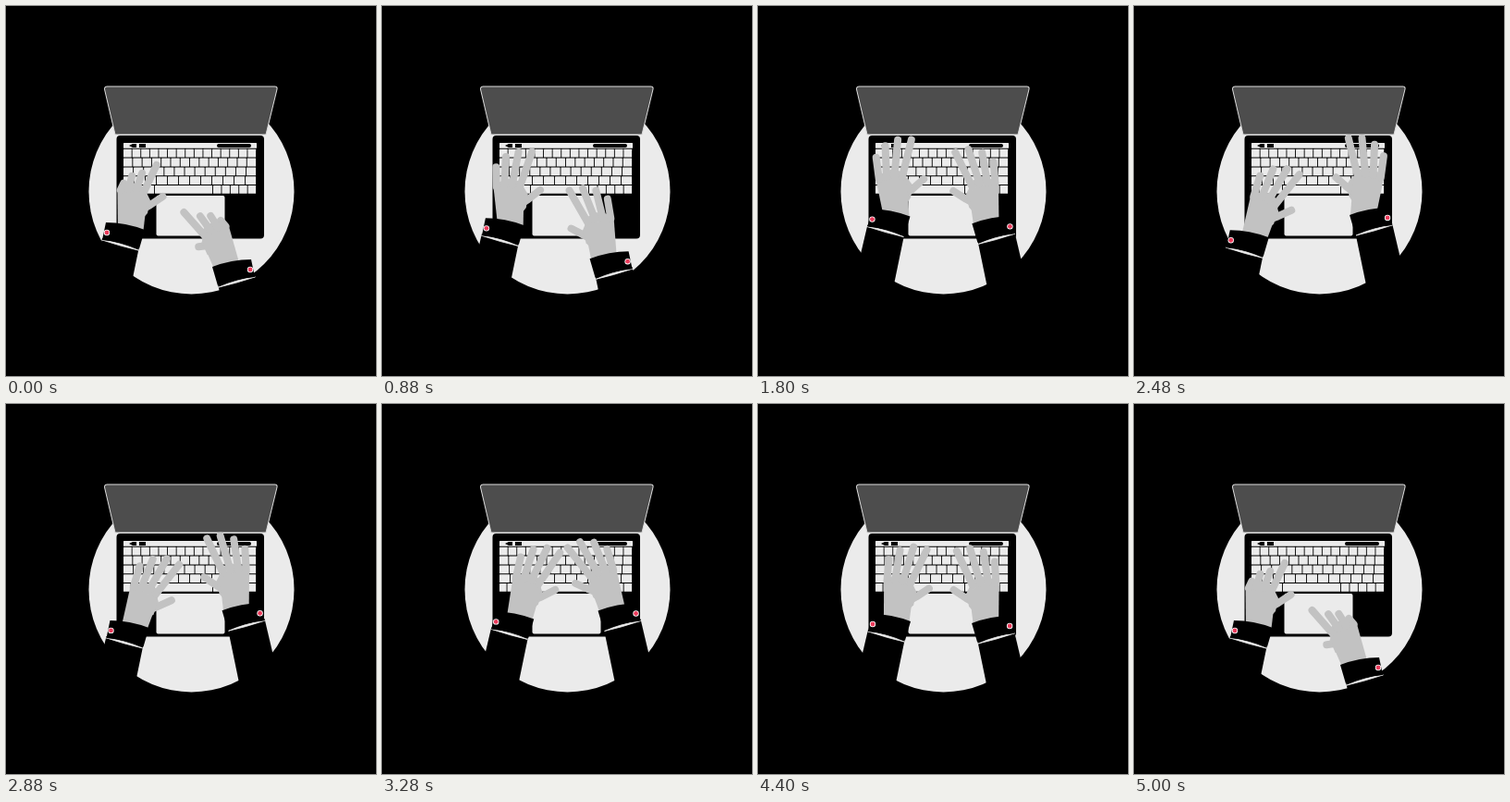
An HTML page with a canvas for the animation above (5.04 s loop, 400 by 400 pixels).

```html
<!DOCTYPE html>
<html lang="en">
<head>
<meta charset="utf-8">
<title>Typing hands</title>
<style>
  html, body { margin: 0; width: 100%; height: 100%; overflow: hidden; background: #000; }
  canvas { display: block; width: 400px; height: 400px; }
</style>
</head>
<body>
<canvas id="stage" width="400" height="400"></canvas>
<script>
const ctx = document.getElementById('stage').getContext('2d');
const LOOP = 5040;
const LIGHT = '#ebebeb', SKIN = '#c2c2c2', LID = '#4d4d4d', PINK = '#ec3b5b';
const TAU = Math.PI * 2;

const rad = degrees => degrees * Math.PI / 180;
const mix = (a, b, u) => a + (b - a) * u;
const polar = (degrees, r) => [Math.sin(rad(degrees)) * r, -Math.cos(rad(degrees)) * r];

function ease(from, to, time) {
  const u = Math.min(1, Math.max(0, (time - from) / (to - from)));
  return u * u * (3 - 2 * u);
}

// Both hands rest, travel to the keyboard, type, and return.
function posesAt(time) {
  const back = ease(4450, 4840, time);
  const typing = ease(680, 1280, time) - back;
  const curl = 1 - ease(500, 1000, time) + back;
  const wiggle = 1.5 * (1 - Math.cos(TAU * time / 560));

  const arc = Math.sin(Math.PI * (time - 1700) / 2700);
  const dip = Math.exp(-(((time - 2560) / 400) ** 2));
  const drift = (time - 1800) / 2600;
  const sway = -14 * arc * Math.cos(TAU * (time - 2480) / 1600);

  const left = {
    x: mix(109, 124 - 20 * dip, typing),
    y: mix(245, 230 + 8 * drift + 22 * dip, typing),
    tilt: mix(-13 + 14 * drift + 14.5 * arc + 12 * dip, wiggle, 1 - typing),
    curl, tuck: 0
  };
  const rightY = mix(285, 240 - 14 * arc, typing);
  const right = {
    x: 264 + 0.18 * (285 - rightY),
    y: rightY,
    tilt: sway * typing + (16.5 - wiggle) * curl,
    curl, tuck: curl
  };
  return { left, right };
}

function polygon(points, color) {
  ctx.beginPath();
  points.forEach(([x, y]) => ctx.lineTo(x, y));
  ctx.closePath();
  ctx.fillStyle = color;
  ctx.fill();
}

function rounded(x, y, w, h, r, color) {
  ctx.beginPath();
  ctx.roundRect(x, y, w, h, r);
  ctx.fillStyle = color;
  ctx.fill();
}

function dot(x, y, r, color) {
  ctx.beginPath();
  ctx.arc(x, y, r, 0, TAU);
  ctx.fillStyle = color;
  ctx.fill();
}

function line(points, width, color) {
  ctx.beginPath();
  points.forEach(([x, y]) => ctx.lineTo(x, y));
  ctx.lineWidth = width;
  ctx.strokeStyle = color;
  ctx.stroke();
}

function keyRow(y, left, right, count) {
  const pitch = (right - left) / count;
  for (let i = 0; i < count; i++) {
    rounded(left + i * pitch, y, pitch - 0.9, 8.8, 0.5, LIGHT);
  }
}

function drawLaptop() {
  dot(200.5, 200.5, 111, LIGHT);

  ctx.beginPath();
  ctx.moveTo(109, 87);
  ctx.lineTo(291, 87);
  ctx.quadraticCurveTo(294, 87, 293, 90);
  ctx.lineTo(281, 139);
  ctx.lineTo(118, 139);
  ctx.lineTo(106.5, 90);
  ctx.quadraticCurveTo(106, 87, 109, 87);
  ctx.fillStyle = LID;
  ctx.fill();
  ctx.lineWidth = 1;
  ctx.strokeStyle = '#dedede';
  ctx.stroke();

  rounded(119.5, 140, 159.5, 111.5, 4, '#000');
  rounded(127, 148, 144, 5.8, 0.5, LIGHT);
  polygon([[133, 151], [137, 149], [141, 149], [141, 153], [137, 153]], '#000');
  rounded(144, 149, 7, 4, 0, '#000');
  rounded(228, 149, 37, 4, 2, '#000');

  for (let row = 0; row < 4; row++) keyRow(154.8 + 9.8 * row, 127, 271, 15 - row);
  keyRow(194, 127, 161, 4);
  keyRow(194, 161, 224, 1);
  keyRow(194, 224, 271, 5);

  rounded(162.5, 205, 74, 43.5, 2, LIGHT);
}

function drawThumb(tilt, tuck) {
  ctx.save();
  ctx.rotate(rad(tilt * 0.7));
  const reach = 1 - 0.25 * tuck;
  line([[9, -16], [23 * reach, -24], [36.5 * reach, -33 * reach]], 8, SKIN);
  polygon([[10, -36], [19, -37], [23, -29], [20, -15], [10, -4]], SKIN);
  ctx.restore();
}

function drawFingers(curl) {
  for (let i = 0; i < 4; i++) {
    const bend = curl * (i === 3 ? 0.1 : 0.24);
    const length = (86 - 2 * (3 - i) ** 2) * (1 - bend) - 4;
    line([polar(-13 + 12 * i, 41), polar(-7 + 10.3 * i, length)], 8, SKIN);
  }
}

function drawSleeve() {
  polygon([[-5, 6], [35, 15], [15, 112], [-30, 112]], '#000');

  // Pale seam showing below the cuff.
  ctx.beginPath();
  ctx.moveTo(-5, 8);
  ctx.quadraticCurveTo(16, 11, 34, 19);
  ctx.quadraticCurveTo(16, 15, -5, 8);
  ctx.fillStyle = ctx.strokeStyle = LIGHT;
  ctx.fill();
  ctx.lineWidth = 0.8;
  ctx.stroke();

  ctx.beginPath();
  ctx.moveTo(-1, -11);
  ctx.quadraticCurveTo(20, -11, 41, -3);
  ctx.lineTo(35, 17.5);
  ctx.quadraticCurveTo(16, 10, -5, 8);
  ctx.closePath();
  ctx.fillStyle = '#000';
  ctx.fill();

  dot(0, 0, 3.2, '#fff');
  dot(0, 0, 2.4, PINK);
}

function drawHand({ x, y, tilt, curl, tuck }, side) {
  ctx.save();
  ctx.translate(x, y);
  ctx.scale(side, 1);
  ctx.lineCap = ctx.lineJoin = 'round';

  ctx.save();
  ctx.translate(24, -6);
  drawThumb(tilt, tuck);
  ctx.rotate(rad(tilt));
  polygon([[-12, 5], [-12.5, -38], [-6, -45], [7, -48], [19, -42], [19, -26], [15, 8]], SKIN);
  drawFingers(curl);
  ctx.restore();

  drawSleeve();
  ctx.restore();
}

const start = performance.now();

function draw() {
  const { left, right } = posesAt((performance.now() - start) % LOOP);
  ctx.fillStyle = '#000';
  ctx.fillRect(0, 0, 400, 400);
  drawLaptop();
  drawHand(left, 1);
  drawHand(right, -1);
  requestAnimationFrame(draw);
}

draw();
</script>
</body>
</html>
```
